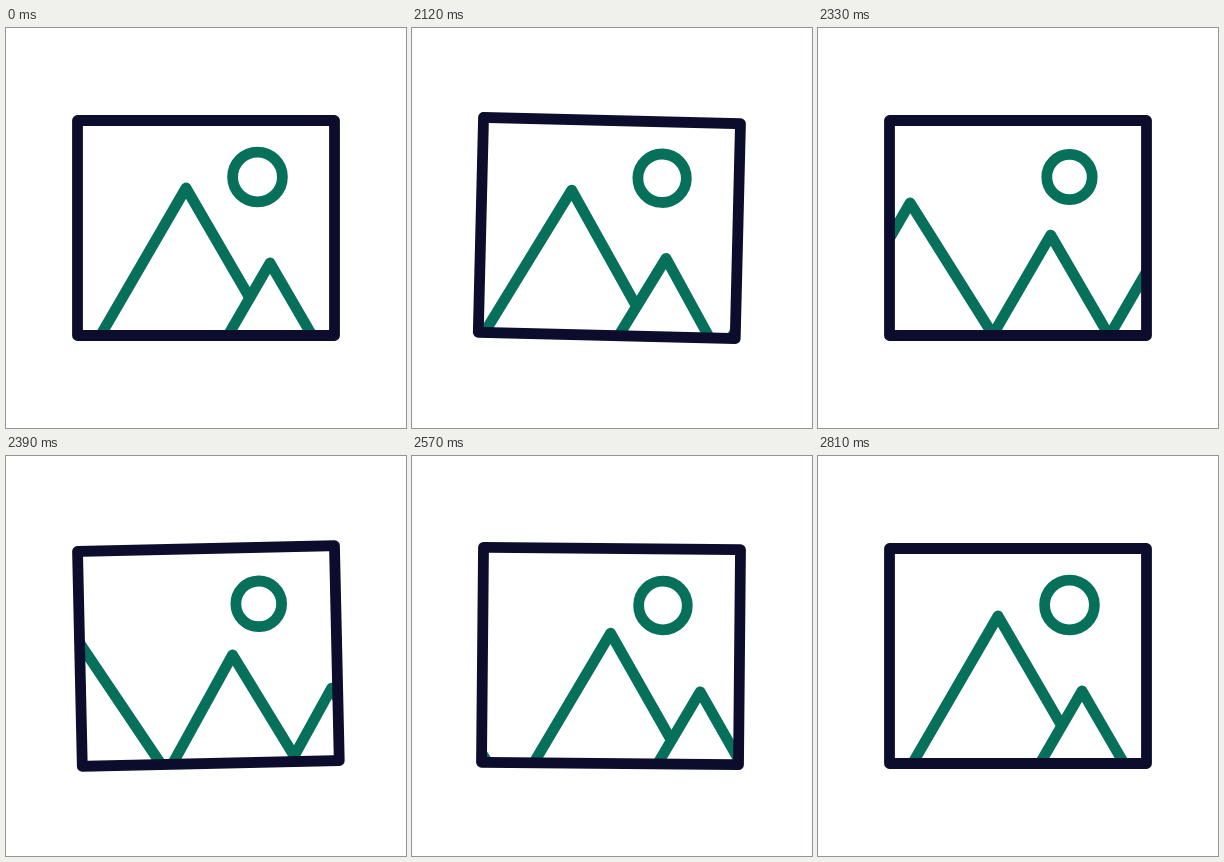
Recreate the animation shown at these times as an HTML page. Size 400 by 400 pixels, loop 2.9 s.

```html
<!DOCTYPE html>
<html lang="en">
<head>
<meta charset="utf-8">
<title>Swinging picture</title>
<style>
html, body { margin: 0; height: 100%; overflow: hidden; background: #fff; }
svg { display: block; width: 100%; height: 100%; }
path, circle, rect { stroke-width: 10.8; stroke-linejoin: round; stroke-linecap: round; }
.green { stroke: #07705a; fill: #fff; }
.frame { stroke: #0c0d2c; fill: none; }
</style>
</head>
<body>
<svg viewBox="0 0 400 400">
  <clipPath id="inside"><rect x="71.5" y="92.5" width="257" height="215"/></clipPath>
  <g id="picture">
    <g class="green" clip-path="url(#inside)">
      <circle id="sun" cx="251.5" cy="149" r="24.9"/>
      <path class="peak"/>
      <path class="peak"/>
      <path class="peak"/>
    </g>
    <rect class="frame" x="71.5" y="92.5" width="257" height="215"/>
  </g>
</svg>
<script>
const LOOP = 2900, START = 2000, STEP = 30, STEPS = 27;
const BASE = 320, SLOPE = 0.58;
const picture = document.getElementById('picture');
const sun = document.getElementById('sun');
const peaks = document.querySelectorAll('.peak');

const clamp = (v, lo, hi) => Math.min(hi, Math.max(lo, v));
const smooth = u => u * u * (3 - 2 * u);

// One half swing between two zero crossings
const lobe = (k, from, to, angle, skew = 1) =>
  k > from && k < to ? angle * Math.sin(Math.PI * ((k - from) / (to - from)) ** skew) : 0;

const swing = k =>
  lobe(k, 0, 11, 1.87, 1.3) + lobe(k, 11, 16, -1.34) + lobe(k, 16, 22, 0.53);

function mountain(path, x, y, rightSlope = SLOPE) {
  const h = BASE - y;
  path.setAttribute('d', `M${x - SLOPE * h} ${BASE}L${x} ${y}L${x + rightSlope * h} ${BASE}`);
}

function draw(now) {
  const k = clamp(Math.floor((now % LOOP - START) / STEP), 0, STEPS);
  const u = k / STEPS;
  const p = 0.78 * smooth(u) + 0.22 * u;

  picture.setAttribute('transform', `rotate(${swing(k)} 200 92.5)`);
  sun.setAttribute('r', 24.9 - 2.2 * smooth(clamp(k < 11 ? k / 11 : (23 - k) / 12, 0, 1)));

  // The large peak leaves, the small one grows into its place, a new one enters
  mountain(peaks[0], 180 - 236 * p, 160 + 40 * p, SLOPE + 0.13 * p);
  mountain(peaks[1], 264 - 84 * p, 235 - 75 * p);
  mountain(peaks[2], 375 - 111 * p, 235);
}

const begin = performance.now();
function tick() {
  draw(performance.now() - begin);
  requestAnimationFrame(tick);
}
tick();
</script>
</body>
</html>
```
